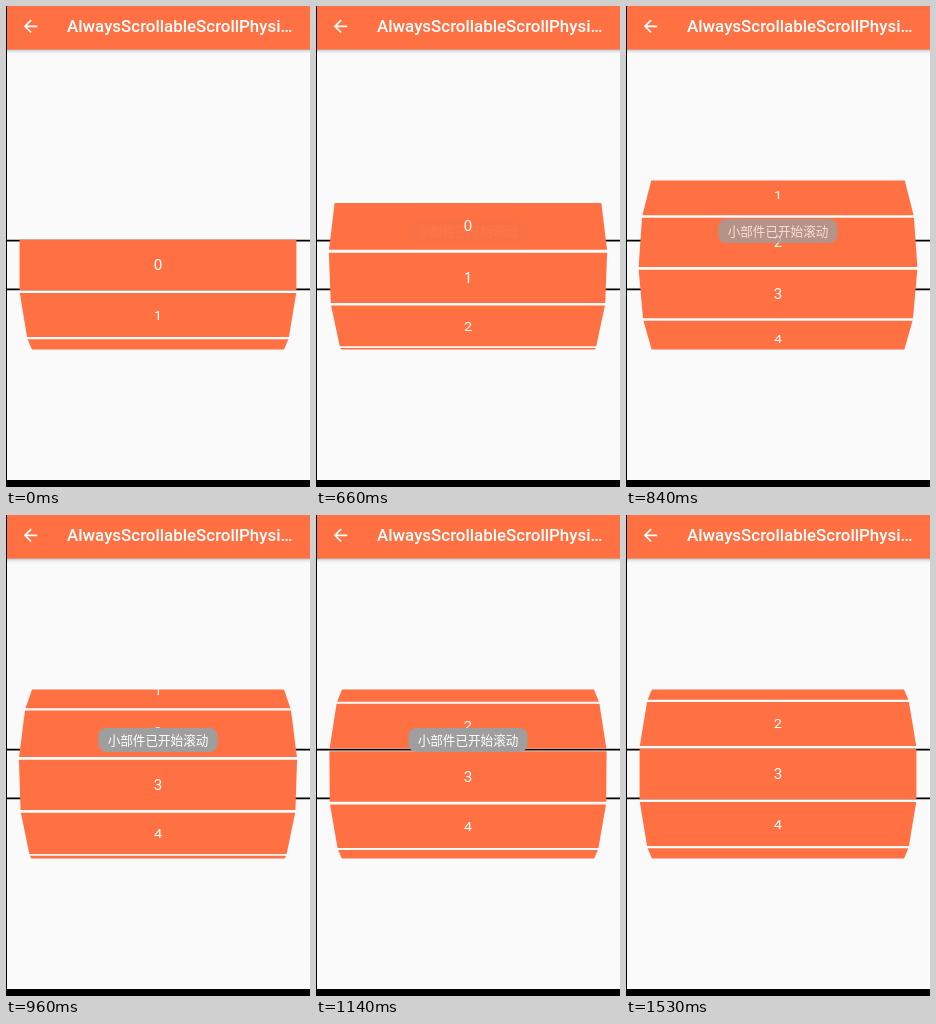
Animation, 304 px wide and 481 px high, one loop 2460 ms. Source, as an HTML page:

```html
<!DOCTYPE html>
<html lang="zh">
<head>
<meta charset="utf-8">
<title>Wheel list</title>
<style>
html, body { margin: 0; width: 100%; height: 100%; overflow: hidden; background: #000; }
svg { display: block; width: 304px; height: 481px; }
text { fill: #fff; }
.title { font: 500 16.9px Roboto, sans-serif; }
.digit { font: 400 18px Roboto, sans-serif; text-anchor: middle; }
.note { font: 400 12.6px "Noto Sans CJK SC", "Noto Sans CJK", sans-serif; text-anchor: middle; }
</style>
</head>
<body>
<svg viewBox="0 0 304 481">
  <defs>
    <linearGradient id="shade" x1="0" y1="0" x2="0" y2="1">
      <stop offset="0" stop-color="#000" stop-opacity=".3"/>
      <stop offset=".4" stop-color="#000" stop-opacity=".1"/>
      <stop offset="1" stop-color="#000" stop-opacity="0"/>
    </linearGradient>
    <clipPath id="view"><rect x="-180" y="-100" width="360" height="200"/></clipPath>
  </defs>
  <rect width="304" height="481" fill="#000"/>
  <rect x="1" width="303" height="474" fill="#fafafa"/>
  <rect x="1" y="43" width="303" height="5" fill="url(#shade)"/>
  <rect x="1" width="303" height="43.5" fill="#ff7043"/>
  <path transform="translate(14.4 10.2) scale(.844)" fill="#fff"
    d="M20 11H7.83l5.59-5.59L12 4l-8 8 8 8 1.41-1.41L7.83 13H20v-2z"/>
  <text class="title" x="61" y="26.4">AlwaysScrollableScrollPhysi…</text>
  <path d="M1 234.6H304M1 283.4H304" stroke="#000" stroke-width="1.7"/>
  <g transform="translate(152 259) scale(.844)">
    <g id="wheel" clip-path="url(#view)"></g>
  </g>
  <g id="toast">
    <rect x="92.5" y="213" width="119" height="24" rx="8" fill="#9e9e9e"/>
    <text class="note" x="152" y="229.8">小部件已开始滚动</text>
  </g>
</svg>
<script>
const NS = 'http://www.w3.org/2000/svg';
const LOOP = 2460, STEP = 30;
const RADIUS = 200, PERSP = 0.003, HALF_W = 164, HALF_H = 30;
const wheel = document.getElementById('wheel');
const toast = document.getElementById('toast');

function add(tag, parent, attrs) {
  const el = document.createElementNS(NS, tag);
  for (const k in attrs) el.setAttribute(k, attrs[k]);
  return parent.appendChild(el);
}

const items = Array.from({ length: 8 }, (_, i) => {
  const g = add('g', wheel, {});
  const face = add('polygon', g, { fill: '#ff7043' });
  const label = add('text', g, { class: 'digit', y: 6.2 });
  label.textContent = i;
  return { g, face, label };
});

const clamp = v => Math.max(0, Math.min(1, v));

// Scroll position in items: a drag, then a decaying fling onto item 3
function scrollAt(t) {
  if (t < 600 || t >= 2460) return 0;
  if (t < 750) {
    const u = (t - 600) / 150, u2 = u * u, u3 = u2 * u;
    return 0.135 * (2 * u3 - 3 * u2 + 1) + 1.2 * (u3 - 2 * u2 + u)
      + 1.81 * (3 * u2 - 2 * u3) + 1.48 * (u3 - u2);
  }
  return t < 1365 ? 3 - 1.19 * Math.exp(-0.0083 * (t - 750)) : 3;
}

const toastAt = t => t < 1360 ? clamp((t - 650) / 250) : clamp((1530 - t) / 170);

// Projects a point of a card, v below its middle, from the cylinder
function project(angle, v) {
  const s = Math.sin(angle), c = Math.cos(angle);
  const w = 1 + PERSP * (RADIUS - RADIUS * c + v * s);
  return { y: (RADIUS * s + v * c) / w, w };
}

function placeItem({ g, face, label }, d) {
  const visible = Math.abs(d) < 3;
  g.style.display = visible ? '' : 'none';
  if (!visible) return;
  const a = d * Math.PI / 10;
  const top = project(a, -HALF_H), mid = project(a, 0), bot = project(a, HALF_H);
  const xt = HALF_W / top.w, xb = HALF_W / bot.w;
  face.setAttribute('points',
    `${-xt},${top.y} ${xt},${top.y} ${xb},${bot.y} ${-xb},${bot.y}`);
  const sy = Math.cos(a) / mid.w - RADIUS * PERSP * Math.sin(a) ** 2 / mid.w ** 2;
  label.setAttribute('transform', `matrix(${1 / mid.w} 0 0 ${sy} 0 ${mid.y})`);
}

function draw(t) {
  const pos = scrollAt(t);
  items.forEach((item, i) => placeItem(item, i - pos));
  toast.setAttribute('opacity', toastAt(t));
}

const start = performance.now();
function tick() {
  const t = (performance.now() - start) % LOOP;
  draw(Math.floor(t / STEP) * STEP);
  requestAnimationFrame(tick);
}
draw(0);
requestAnimationFrame(tick);
</script>
</body>
</html>
```
